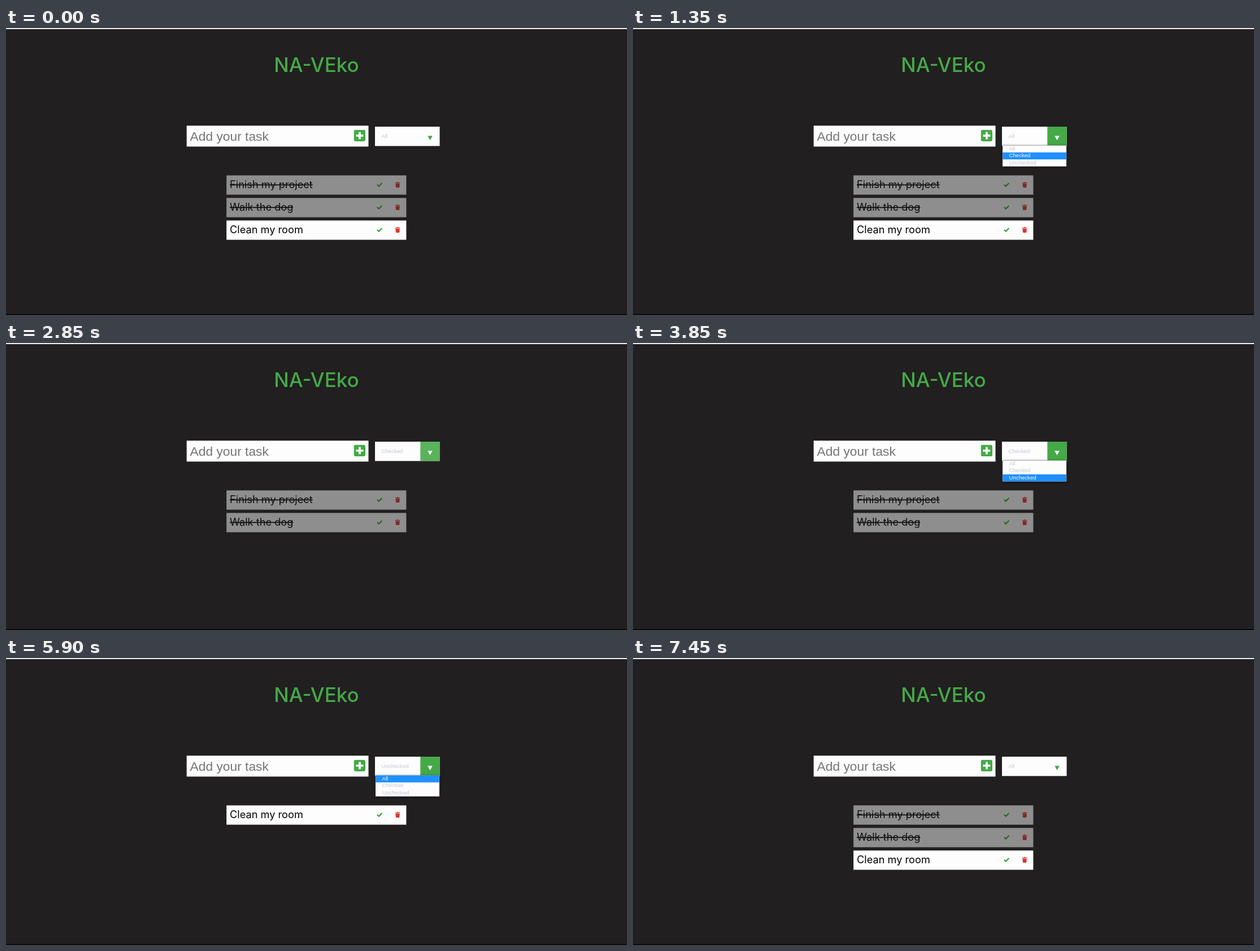
These frames come from a looping animation (1099 by 509 pixels, 7500 ms). An HTML page:

```html
<!DOCTYPE html>
<html lang="en">
<head>
<meta charset="utf-8">
<title>Task list</title>
<style>
  html, body { margin: 0; width: 100%; height: 100%; overflow: hidden; background: #211f20; }
  svg { display: block; width: 100%; height: 100%; }
  .title { font: 500 35px Inter, sans-serif; fill: #45a947; text-anchor: middle; }
  .hint { font: 22.8px "Liberation Sans", sans-serif; fill: #757575; }
  .small { font: 9.6px "Liberation Sans", sans-serif; fill: #c6c3d8; }
  .task { font: 18.2px Inter, sans-serif; fill: #000; }
  .done { opacity: .5; }
  .done .task { text-decoration: line-through; }
  #menu { filter: drop-shadow(0 1px 2px rgba(0, 0, 0, .55)); }
</style>
</head>
<body>
<svg viewBox="0 0 1099 509">
  <defs>
    <g id="icons">
      <path d="M656.8 277.7l3 2.9 5.6-5.7" fill="none" stroke="#3aa53c" stroke-width="2.2"/>
      <path d="M688.8 273.9h2.7l.7-.9h1.8l.7.9h2.7v1.3h-8.6zM689.4 276h7.4l-.5 6q-.1 1-1.1 1h-4.2q-1 0-1.1-1z" fill="#dc3330"/>
    </g>
  </defs>
  <rect width="1099" height="509" fill="#211f20"/>
  <rect width="1099" height="2" fill="#e9eceb"/>
  <rect y="507" width="1099" height="2" fill="#0c0a0b"/>
  <text class="title" x="549.5" y="78">NA-VEko</text>

  <rect x="319.7" y="173.2" width="321.8" height="37.1" fill="#fdfdfd"/>
  <text class="hint" x="325.5" y="199.8">Add your task</text>
  <rect x="615.8" y="180.8" width="20.2" height="20.2" rx="2.4" fill="#45a947"/>
  <path d="M625.9 184.5v12.8M619.5 190.9h12.8" stroke="#fff" stroke-width="3.8"/>

  <rect x="653" y="175" width="114.5" height="34.3" fill="#fdfdfd"/>
  <text class="small" id="value" x="664.6" y="194.9"></text>
  <rect id="button" x="733.3" y="175" width="34.2" height="34.3" fill="#45a947"/>
  <path id="arrow" d="M746.2 191.2h8.6l-4.3 7.8z"/>

  <g id="rows"></g>
  <g id="menu">
    <rect x="654" y="208.2" width="113" height="37.3" fill="#fdfdfd" stroke="#8d8d8d" stroke-width=".6"/>
  </g>
</svg>
<script>
const LOOP = 7500, FADE = 250;
const FILTERS = ["All", "Checked", "Unchecked"];
const TASKS = [["Finish my project", true], ["Walk the dog", true], ["Clean my room", false]];

// [start ms, value]
const selected = [[0, 0], [1500, 1], [3950, 2], [6850, 0]];
const pointed = [
  [0, -1], [850, 0], [1200, 1], [1500, -1],
  [3050, 1], [3600, 2], [3950, -1],
  [5300, 2], [5550, 1], [5750, 0], [6850, -1]
];
const hovered = [[0, 0], [550, 1], [1500, 0], [2700, 1], [3950, 0], [5000, 1], [6850, 0]];

const $ = id => document.getElementById(id);
const at = (track, t) => track.findLast(step => step[0] <= t);

function add(parent, tag, attrs, text = "") {
  const el = document.createElementNS(parent.namespaceURI, tag);
  for (const key in attrs) el.setAttribute(key, attrs[key]);
  el.textContent = text;
  return parent.appendChild(el);
}

const rows = TASKS.map(([name, done]) => {
  const el = add($("rows"), "g", { class: done ? "done" : "" });
  add(el, "rect", { x: 390.2, y: 261.4, width: 318.2, height: 34.2, fill: "#fdfdfd" });
  add(el, "text", { class: "task", x: 396, y: 284.3 }, name);
  add(el, "use", { href: "#icons" });
  return { el, done };
});

const options = FILTERS.map((name, i) => {
  const y = 208.2 + i * 12.4;
  const bar = add($("menu"), "rect", { x: 654.2, y, width: 112.6, height: 12.4, fill: "#1e90ff" });
  const label = add($("menu"), "text", { class: "small", x: 665.6, y: y + 8.8 }, name);
  return { bar, label };
});

// Same curve as the CSS "ease" keyword.
function ease(x) {
  let lo = 0, hi = 1, u = .5;
  for (let i = 0; i < 20; i++) {
    u = (lo + hi) / 2;
    const bx = 3 * .25 * u * (1 - u) ** 2 + 3 * .25 * u * u * (1 - u) + u ** 3;
    if (bx < x) lo = u; else hi = u;
  }
  return 3 * .1 * u * (1 - u) ** 2 + 3 * u * u * (1 - u) + u ** 3;
}

function hoverLevel(t) {
  const [start, on] = at(hovered, t);
  if (!start) return 0;
  const k = ease(Math.min(1, (t - start) / FADE));
  return on ? k : 1 - k;
}

function draw(t) {
  const filter = at(selected, t)[1], point = at(pointed, t)[1], level = hoverLevel(t);

  $("value").textContent = FILTERS[filter];
  $("button").style.opacity = level;
  const mix = [69, 169, 71].map(c => Math.round(c + (255 - c) * level));
  $("arrow").style.fill = `rgb(${mix})`;

  $("menu").style.display = point < 0 ? "none" : "";
  options.forEach(({ bar, label }, i) => {
    bar.style.display = i === point ? "" : "none";
    label.style.fill = i === point ? "#fff" : "";
  });

  let line = 0;
  for (const { el, done } of rows) {
    const shown = filter === 0 || done === (filter === 1);
    el.style.display = shown ? "" : "none";
    if (shown) el.setAttribute("transform", `translate(0 ${40 * line++})`);
  }
}

function frame() {
  draw(performance.now() % LOOP);
  requestAnimationFrame(frame);
}
frame();
</script>
</body>
</html>
```
